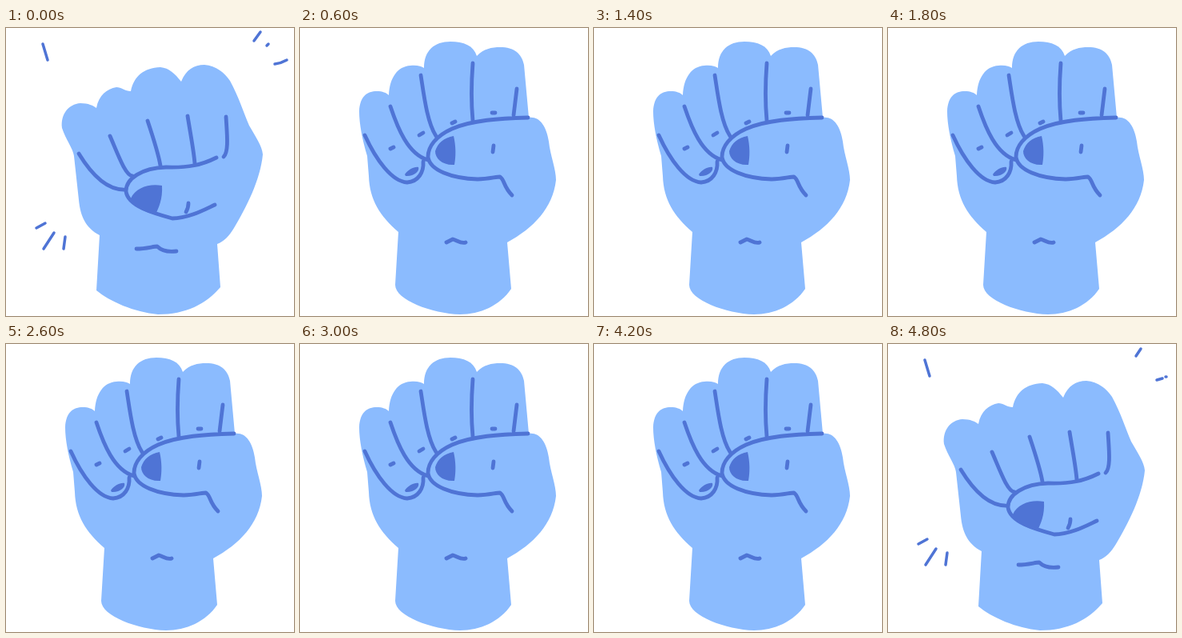
Animation, 360 px wide and 360 px high, one loop 5000 ms. Source, as an HTML page:

```html
<!DOCTYPE html>
<html lang="en">
<head>
<meta charset="utf-8">
<title>Knocking fist</title>
<style>
  html, body { margin: 0; width: 100%; height: 100%; overflow: hidden; background: #fff; }
  svg { display: block; width: 100vw; height: 100vh; }
  .skin { fill: #8bbbfe; }
  .nail { fill: #4f74d5; }
  .line { fill: none; stroke: #4f74d5; stroke-width: 4.8; stroke-linecap: round; stroke-linejoin: round; }
  .spark { stroke-width: 3.5; }
  .pose, .first, .later { visibility: hidden; }
</style>
</head>
<body>
<svg viewBox="0 0 360 360">
  <g class="pose" id="hit">
    <path class="skin" d="M113 328L117 259C100 250 93 236 91 215L85 160C84 151 74 138 70 125
      C68 108 78 95 93 94C103 94 109 97 113 100C116 84 126 76 138 74C144 74 149 79 156 79
      C160 60 172 50 193 49C204 50 211 57 219 67C225 52 235 46 248 46C263 47 273 56 280 66
      C291 86 297 106 304 122C312 136 320 147 321 158C318 190 300 225 285 250C279 260 272 267 264 270L268 324
      C250 345 225 358 190 358C160 355 130 342 113 328Z"/>
    <path class="line" d="M91 157C105 180 125 203 149 202M130 135C140 158 149 184 158 185
      M177 116C185 140 191 160 193 172M227 110C231 135 235 155 236 170M275 111C276 130 279 155 272 161
      M263 162C245 171 228 175 200 174C170 175 150 188 150 204C152 223 186 232 208 238C228 238 248 227 261 221
      M228 219Q228 225 225 230M163 276C175 276 184 273 189 273C195 279 205 280 213 279"/>
    <path class="nail" d="M156 213C162 199 180 194 195 197C196 214 191 224 187 233C172 230 159 223 156 213Z"/>
    <path class="line spark" d="M46 20L52 40M47 276L60 256M72 276L74 261M38 250L49 244"/>
    <path class="line spark first" d="M310 16L318 5M326 22L328 20M336 45Q344 44 351 40"/>
    <path class="line spark later" d="M310 15L316 6M336 45L343 43M347 41L348 41"/>
  </g>
  <g class="pose" id="up">
    <path class="skin" d="M119 321L123 255C100 235 87 215 86 185L84 160C78 140 74 120 74 104
      C75 85 84 79 96 79C103 79 108 81 111 84C112 62 122 48 138 47C146 46 152 48 155 50
      C155 28 168 17 188 17C205 17 217 22 221 35C229 26 240 24 250 24C268 24 277 32 280 46L286 112
      C299 110 308 122 311 142C313 160 320 176 320 190C316 225 292 250 259 268L264 326
      C250 347 225 358 200 358C165 357 119 340 119 321Z"/>
    <path class="line" d="M81 134C95 165 115 192 134 193C148 192 155 180 154 167
      M113 98C122 125 135 158 160 165M151 59C155 85 159 118 170 135M216 44C214 70 214 95 216 116
      M271 76L267 109M285 112C250 113 215 115 190 126C170 135 160 148 160 161
      C162 178 190 188 222 189C235 189 245 186 250 186C256 190 254 198 265 209
      M113 151L117 149M149 134L154 131M190 119L194 117M240 106L244 106M242 147L241 155
      M183 268L191 264C197 266 202 270 207 268"/>
    <path class="nail" d="M169 154C172 144 180 137 192 135C195 148 195 160 193 171C178 172 169 163 169 154Z
      M131 183C135 177 143 173 148 174C150 179 142 186 132 185Z"/>
  </g>
</svg>
<script>
  const STEP = 200, LOOP = 5000;
  const poses = ["hit", "up", "top", "up"];
  const hit = document.getElementById("hit");
  const up = document.getElementById("up");
  const first = document.querySelector(".first");
  const later = document.querySelector(".later");
  // The raised fist is the upright one reaching higher from the wrist.
  const raised = "translate(320 360) scale(1.016 1.047) translate(-320 -360)";
  const start = performance.now();

  function show(el, on) {
    el.style.visibility = on ? "visible" : "hidden";
  }

  function draw(now) {
    const step = Math.floor((Math.max(0, now - start) % LOOP) / STEP);
    const pose = poses[step % poses.length];
    show(hit, pose === "hit");
    show(up, pose !== "hit");
    up.setAttribute("transform", pose === "top" ? raised : "");
    show(first, step === 0);
    show(later, pose === "hit" && step > 0);
    requestAnimationFrame(draw);
  }
  draw(start);
</script>
</body>
</html>
```
